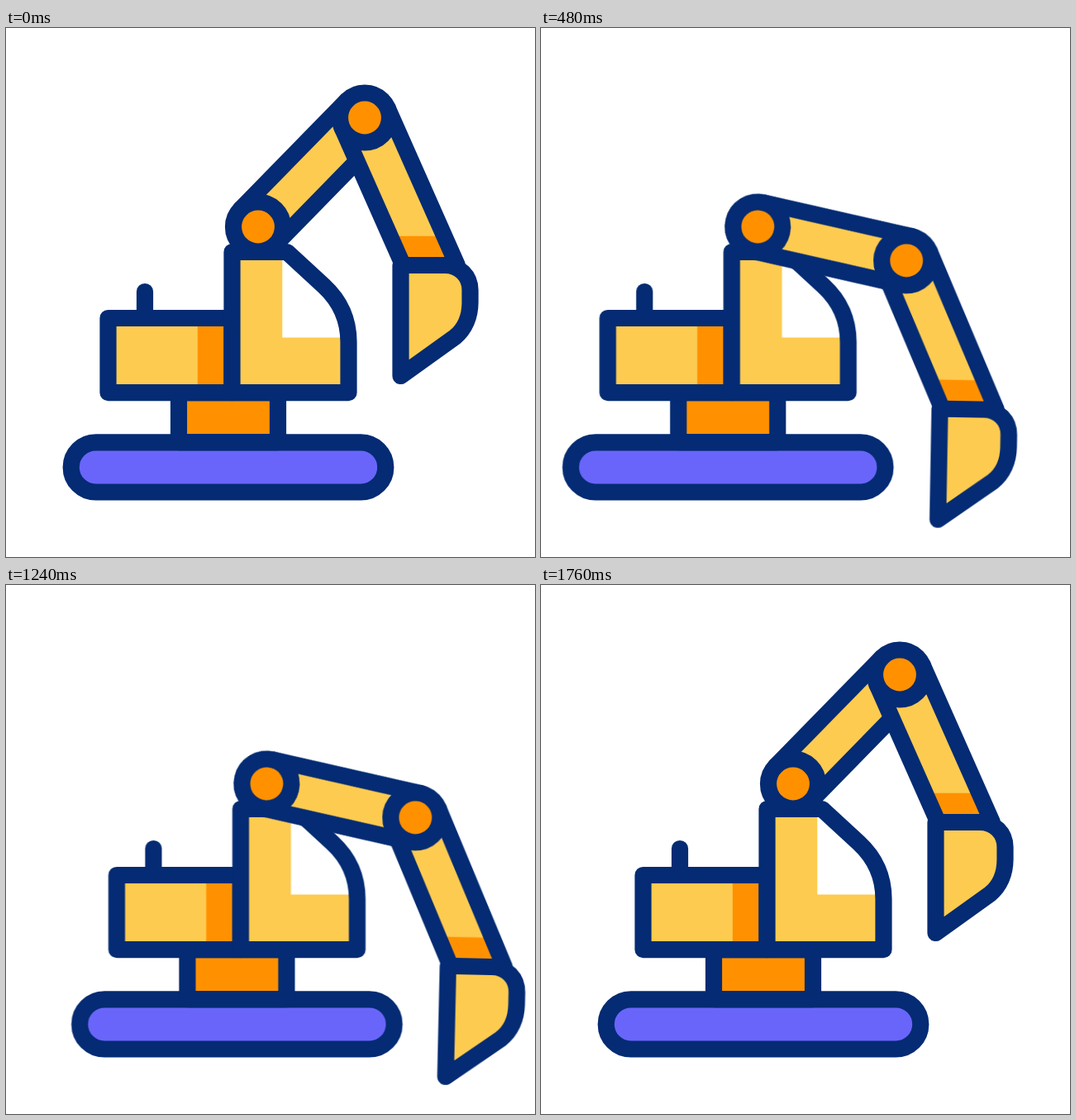
Animation, 640 px wide and 640 px high, one loop 2 s. Source, as an HTML page without scripts:

```html
<!DOCTYPE html>
<html lang="en">
<head>
<meta charset="utf-8">
<title>Excavator</title>
<style>
  html, body { margin: 0; width: 100%; height: 100%; overflow: hidden; background: #fff; }
  svg { display: block; width: 100%; height: 100%; }

  .line { stroke: #042b73; stroke-width: 20.2; stroke-linecap: round; stroke-linejoin: round; }
  .none { fill: none; }
  .yellow { fill: #fdcb50; }
  .orange { fill: #ff9100; }
  .purple { fill: #6965fa; }
  .white { fill: #fff; }

  .digger, .boom, .stick { animation: 2s ease-in-out infinite; }
  .digger { animation-name: drive; }
  .boom { animation-name: lift; transform-origin: 305px 240.5px; }
  .stick { animation-name: dig; transform-origin: 434px 108.5px; }

  @keyframes drive {
    0%, 87%, 100% { transform: translateX(0); }
    26.5% { transform: translateX(-43.5px); }
    51.8% { transform: translateX(12.6px); }
  }
  @keyframes lift {
    0%, 86.5%, 100% { transform: rotate(0deg); }
    23.5%, 65% { transform: rotate(58.46deg); }
  }
  /* counters the boom, with a scoop in the middle */
  @keyframes dig {
    0%, 86.5%, 100% { transform: rotate(0deg); }
    23.5%, 65% { transform: rotate(-57.46deg); }
    40.5% { transform: rotate(-47.16deg); }
  }
</style>
</head>
<body>
<svg viewBox="0 0 640 640">
  <g class="digger">
    <!-- track and turntable -->
    <rect class="line purple" x="78.7" y="501.3" width="380.6" height="60.2" rx="30.1"/>
    <rect class="line orange" x="209" y="441.2" width="120" height="60"/>

    <!-- engine -->
    <path class="line none" d="M168 319V351"/>
    <rect class="yellow" x="123.5" y="351" width="150" height="90"/>
    <rect class="orange" x="231.8" y="351" width="42" height="90"/>
    <rect class="line none" x="123.5" y="351" width="150" height="90.2"/>

    <!-- cab -->
    <path class="white" d="M273.5 271H340L384.5 312C404 330 414.5 353 414.5 380V441H273.5Z"/>
    <path class="yellow" d="M273.5 271H334.3V374.4H414.5V441H273.5Z"/>
    <path class="line none" d="M273.5 271H340L384.5 312C404 330 414.5 353 414.5 380V441.2H273.5Z"/>

    <g class="boom">
      <rect class="line yellow" x="305" y="210.5" width="184.6" height="60" transform="rotate(-45.66 305 240.5)"/>
      <circle class="line orange" cx="305" cy="240.5" r="30"/>

      <g class="stick">
        <path class="yellow" d="M406.6 120.6L461.4 96.3L545.9 287H480.3Z"/>
        <path class="orange" d="M464.8 251.8H530.3L545.9 287H480.3Z"/>
        <path class="line none" d="M406.6 120.6L461.4 96.3L545.9 287H480.3Z"/>
        <path class="line yellow" d="M477.5 287H531C548.5 287 561.5 300 561.5 317V332C561.5 349 555 364.5 543 374L477.5 421Z"/>
        <circle class="line orange" cx="434" cy="108.5" r="30"/>
      </g>
    </g>
  </g>
</svg>
</body>
</html>
```
